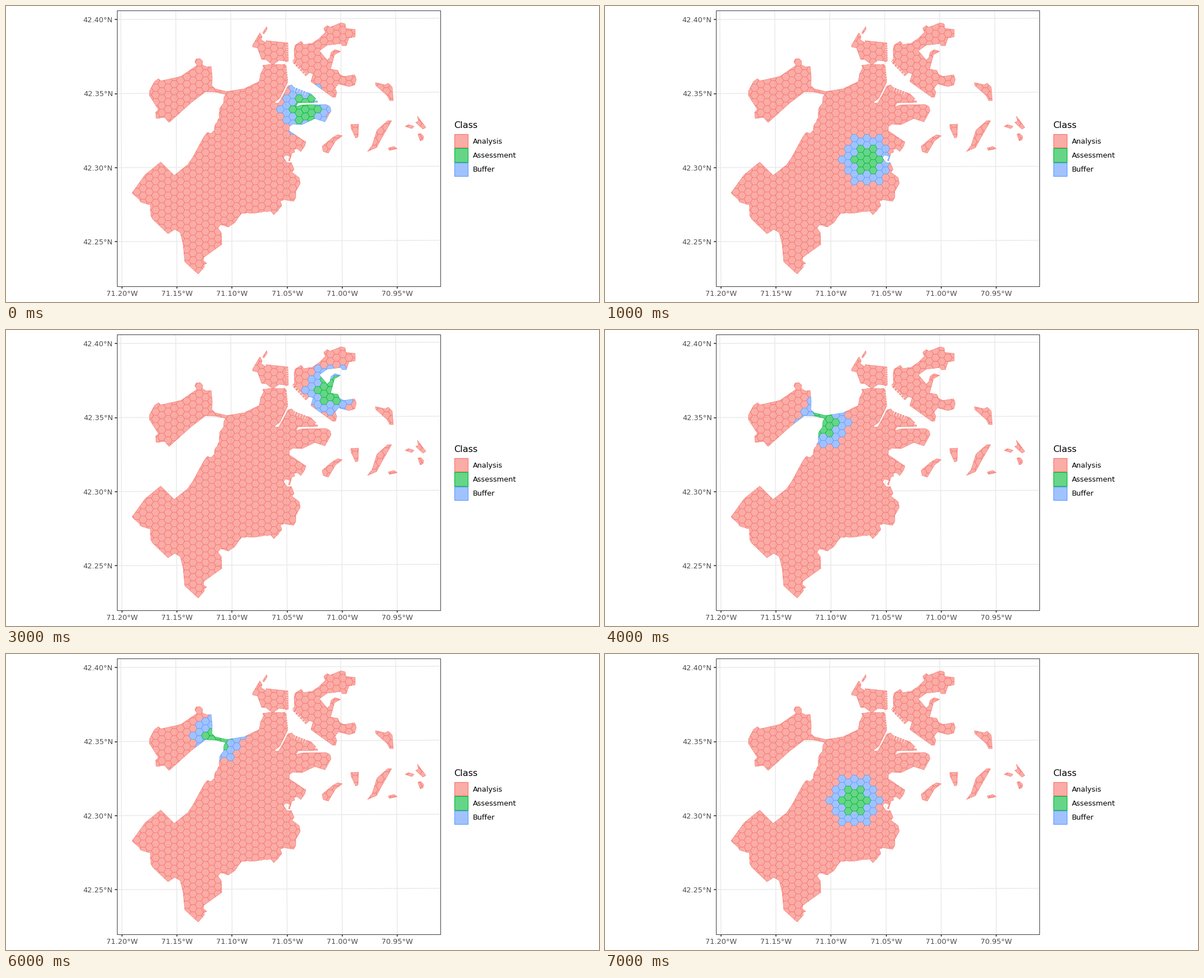
A matplotlib script that plays this animation: 1058 by 529 pixels, repeating every 8 s.

```python
import numpy as np
import matplotlib.pyplot as plt
from matplotlib.animation import FuncAnimation
from matplotlib.collections import PolyCollection
from matplotlib.colors import to_rgba
from matplotlib.patches import PathPatch, Rectangle
from matplotlib.path import Path

plt.rcParams["font.family"] = "DejaVu Sans"

CLASSES = {"Analysis": "#F8766D", "Assessment": "#00BA38", "Buffer": "#619CFF"}
HAIRLINE = 0.43
RULE = 1.07

# Hexagon lattice: column step, row step, origin
COL = 11.13
ROW = COL * 2 / np.sqrt(3)
ORIGIN = np.array([467.2, 274.5])

# Centre of the assessed area in each one-second step: column, row, nudge in y
CENTRES = [(6, -7, 0), (0, 0, 0), (-7, 1.5, 0), (10, -13, 0),
           (-7, -8.5, 0), (-18, 2, 0), (-8, -10, 1), (-2, -1, 0)]

rng = np.random.default_rng(4)


def comb(start, end, count, depth, gap=0.4):
    """Shoreline from start to end with narrow docks cut inward."""
    a, b = np.array(start, float), np.array(end, float)
    step = (b - a) / count
    inward = np.array([-step[1], step[0]]) / np.hypot(*step) * depth
    points = []
    for i in range(count):
        p, q = a + step * i, a + step * (i + 1 - gap)
        points += [p, q, q + inward, a + step * (i + 1) + inward]
    return points + [b]


def rough(points, size=1.0, spacing=5):
    """Shoreline through the points with a small seeded wobble between them."""
    line = []
    for a, b in zip(points, points[1:]):
        a, b = np.array(a, float), np.array(b, float)
        n = max(1, round(np.hypot(*(b - a)) / spacing))
        line.append(a)
        line += [a + (b - a) * i / n + rng.uniform(-size, size, 2)
                 for i in range(1, n)]
    return line + [np.array(points[-1], float)]


downtown = [
    (454, 122), (460, 110), *rough([(458, 106), (497, 104)], 1.5),
    *comb((500, 108), (503, 135), 6, 3), (500, 141), (489, 164), (479, 172),
    (481, 174), (487, 173), (497, 155), (503, 143), (510, 141)]

seaport = [
    *comb((513, 145), (536, 154), 5, 7), (544, 157), (553, 166), (548, 168),
    (556, 170), (556, 172), (521, 173), (517, 180), (527, 177), (571, 176),
    (578, 180), (580, 187), (569, 207), (551, 201), (528, 212), (512, 211),
    (506, 215), (505, 223)]

east_coast = [
    (517, 231), (530, 240), (535, 243), (533, 250), (526, 260), (520, 255),
    (514, 256), (515, 261), (510, 263), (506, 277), (504, 276), (507, 269),
    (499, 266), (495, 271), (501, 280), (509, 280), (514, 292), (510, 297),
    (523, 307), (525, 317), (517, 331), (517, 342), (513, 349)]

south_coast = rough([
    (496, 346), (489, 349), (492, 357), (478, 373), (472, 366), (440, 370),
    (421, 370), (408, 387), (397, 395), (383, 391), (378, 397)], 0.8)

south_west = [
    (384, 405), (385, 426), (353, 449), (352, 455), (358, 460), (353, 462),
    (354, 466), (343, 479), (319, 457), (316, 425), (311, 405), (301, 399),
    (289, 407), (262, 381),
    *rough([(258, 374), (257, 355), (240, 350), (238, 346)]),
    (225, 334), (248, 302), (276, 279), (300, 303), (324, 284), (333, 271),
    (353, 234), (359, 226), (366, 228), (372, 222),
    *rough([(372, 216), (381, 199), (381, 184), (388, 174)]), (389, 163),
    (392, 158), (375, 154)]

north_west = [
    (356, 153), (330, 173), (291, 208), (283, 199), (268, 201), (267, 190),
    (272, 185), (256, 160), (256, 152), (265, 135), (272, 130), (276, 134),
    (312, 126), (341, 106), (337, 100), (339, 95), (346, 94), (351, 99),
    (350, 105), (358, 109), (366, 108), (368, 128), (367, 142), (373, 148),
    (394, 153), (425, 148), (452, 135)]

harbour_north = [
    (440, 70), (453, 48), (457, 55), (455, 60), (464, 66), (464, 62),
    (494, 65), *comb((503, 66), (504, 99), 8, 5), (487, 97), (476, 105),
    (464, 96), (456, 95), (449, 75), (440, 73)]

harbour_east = [
    (514, 79), *rough([(516, 70), (527, 63), (531, 69), (546, 67)], 0.8),
    (559, 58), (570, 47), (567, 40), (573, 35), (578, 38), (598, 30),
    (605, 32), (606, 40), (623, 42), (623, 55), (612, 57), (607, 71),
    (600, 71), (598, 67), (573, 70), (559, 80), (573, 97), (578, 92),
    (580, 83), (587, 78), (597, 81), (586, 87), (579, 113), (592, 115),
    (595, 122), (603, 126), (622, 123), (625, 131), (622, 141), (612, 144),
    (593, 139), (587, 147), (590, 154), (588, 163), (583, 163), (544, 135),
    (548, 121), (541, 119), *comb((535, 125), (511, 100), 6, 4), (515, 94)]

mainland = downtown + seaport + east_coast + south_coast + south_west + north_west

islet = [(465, 37), (466, 41), (460, 50), (458, 48)]
north_island = [(659, 137), (676, 141), (682, 138), (689, 145), (691, 169),
                (685, 169), (680, 160), (660, 142)]
round_island = [(615, 212), (629, 211), (628, 234), (624, 236), (616, 219)]
curved_island = [(564, 251), (583, 235), (592, 230), (600, 232), (588, 241),
                 (575, 263), (566, 260)]
long_island = [(681, 205), (688, 205), (673, 231), (661, 253), (645, 260),
               (653, 250), (662, 222)]
sandbar = [(682, 254), (692, 251), (698, 255), (684, 258)]
west_rock = [(712, 215), (718, 212), (728, 215), (724, 219)]
east_rock = [(734, 197), (749, 217), (744, 220), (731, 208), (736, 206)]
south_rock = [(735, 229), (740, 228), (745, 233), (744, 239), (739, 241)]


def closed_path(points):
    points = [tuple(p) for p in points]
    return Path(points + points[:1], closed=True)


land = Path.make_compound_path(*[closed_path(shape) for shape in (
    mainland, harbour_north, harbour_east, islet, north_island, round_island,
    curved_island, long_island, sandbar, west_rock, east_rock, south_rock)])


def lattice_point(col, row):
    return ORIGIN + np.array([col * COL, row * ROW])


cells = np.array([lattice_point(c, r + (c % 2) / 2)
                  for c in range(-23, 27) for r in range(-20, 18)])
angles = np.radians(np.arange(0, 360, 60))
corners = np.column_stack([np.cos(angles), np.sin(angles)]) * COL / 1.5

fig = plt.figure(figsize=(10, 5), dpi=105.8, facecolor="white")
ax = fig.add_axes([0, 0, 1, 1])
ax.set_xlim(0, 1058)
ax.set_ylim(529, 0)
ax.axis("off")

LEFT, RIGHT, TOP, BOTTOM = 198.4, 774.6, 8.4, 501
GREY = "#4D4D4D"


def rule(xs, ys, color, z):
    ax.plot(xs, ys, color=color, lw=RULE, zorder=z, solid_capstyle="butt")


for i in range(6):
    x = 206.8 + 98.3 * i
    rule([x, x - 2 - 0.2 * i], [BOTTOM, TOP], "#EBEBEB", 1)
    rule([x, x], [BOTTOM, BOTTOM + 4], "#333333", 6)
    ax.text(x, 518, f"{71.2 - 0.05 * i:.2f}°W", size=8.8, color=GREY,
            ha="center", va="baseline")
for i in range(4):
    y = 24.2 + 132.3 * i
    rule([LEFT, RIGHT], [y, y - 2.4], "#EBEBEB", 1)
    rule([LEFT - 4, LEFT], [y, y], "#333333", 6)
    ax.text(190.8, y + 4.8, f"{42.4 - 0.05 * i:.2f}°N", size=8.8, color=GREY,
            ha="right", va="baseline")
ax.add_patch(Rectangle((LEFT, TOP), RIGHT - LEFT, BOTTOM - TOP, fill=False,
                       ec="#333333", lw=0.65, zorder=7))

ax.text(799.5, 218, "Class", size=11, va="baseline")
for i, (name, color) in enumerate(CLASSES.items()):
    y = 228.9 + 25.4 * i
    ax.add_patch(Rectangle((800.2, y), 24, 24.2, fc=to_rgba(color, 0.6),
                           ec=color, lw=0.8))
    ax.text(832.6, y + 16.8, name, size=8.8, va="baseline")

layers = {}
for z, name in enumerate(["Analysis", "Buffer", "Assessment"]):
    color = CLASSES[name]
    hexes = PolyCollection([], facecolors=[to_rgba(color, 0.6)],
                           edgecolors=[color], linewidths=HAIRLINE, zorder=3 + z / 10)
    ax.add_collection(hexes, autolim=False)
    hexes.set_clip_path(land, ax.transData)
    coast = PathPatch(land, fill=False, ec=color, lw=HAIRLINE, zorder=4 + z / 10)
    ax.add_patch(coast)
    layers[name] = hexes, coast


def update(step):
    col, row, nudge = CENTRES[step]
    centre = lattice_point(col, row) + [0, nudge]
    reach = np.hypot(*(cells - centre).T)
    inner = np.sqrt(3) * ROW + 0.2
    outer = 2 * np.sqrt(3) * ROW + 0.2
    members = {"Assessment": reach <= inner,
               "Buffer": (reach > inner) & (reach <= outer),
               "Analysis": reach > outer}
    for name, (hexes, coast) in layers.items():
        polygons = cells[members[name]][:, None] + corners
        hexes.set_verts(polygons)
        area = Path.make_compound_path(*[closed_path(p) for p in polygons])
        coast.set_clip_path(area, ax.transData)
    return [artist for pair in layers.values() for artist in pair]


anim = FuncAnimation(fig, update, frames=8, interval=1000, repeat=True, blit=False)
plt.show()
```
